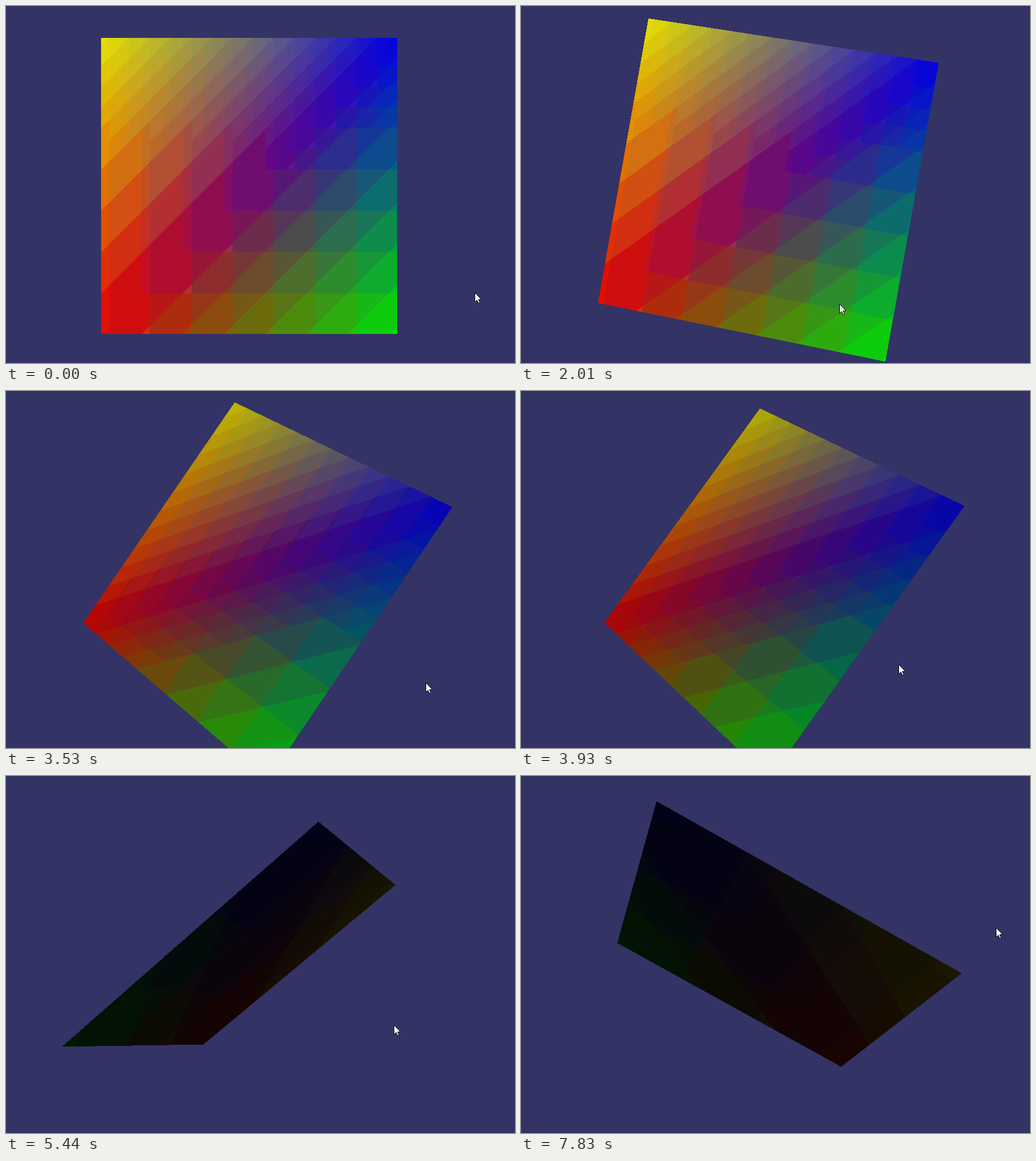
An HTML page with a canvas that plays this animation: 894x627 px, repeating every 7990 ms.

```html
<!DOCTYPE html>
<html lang="en">
<head>
<meta charset="utf-8">
<title>Turning colour square</title>
<style>
  html, body { margin: 0; width: 100%; height: 100%; overflow: hidden; background: #333366; }
  canvas { display: block; width: 100vw; height: 100vh; }
</style>
</head>
<body>
<canvas id="stage" width="894" height="627"></canvas>
<script>
const W = 894, H = 627, LOOP = 7990;
const CX = 427, CY = 316, HALF = 260, CAMERA = 5.65;
const FIRST_TURN = 1590, STEP = 138.67, LEAD = 15;
const ctx = document.getElementById('stage').getContext('2d');
const image = ctx.createImageData(W, H);
const pixels = new Uint32Array(image.data.buffer);
const pack = (r, g, b) => (255 << 24 | b << 16 | g << 8 | r) >>> 0;
const BACK = pack(51, 51, 102);

// Poses as rotation vectors: axis times angle
const POSES = [
  [0, 0, 0],
  [.009, -.138, .176],
  [.216, -.6135, .569],
  [.475, -1.189, .689],
  [.667, -1.841, .805],
  [.743, -2.416, .806],
  [.77, -2.79, 1.707]
];

// Drags: time, pointer x, pointer y, position in POSES
const KEYS = [
  [1036, 823, 503, 0], [1174, 701, 536, 0], [1452, 701, 536, 0],
  [2006, 559, 523, 1], [2838, 185, 417, 2], [2976, 185, 417, 2],
  [3531, 737, 512, 2], [3670, 737, 512, 2], [4641, 220, 288, 3],
  [4900, 150, 260, 4], [5334, 681, 437, 4], [5889, 828, 333, 5],
  [6305, 828, 333, 5], [6580, 856, 338, 5], [6998, 833, 333, 5],
  [7830, 834, 266, 6]
];

const mix = (a, b, k) => a.map((x, i) => x + (b[i] - x) * k);

function stateAt(t) {
  const next = KEYS.findIndex(key => key[0] > t);
  if (next < 0) return KEYS[KEYS.length - 1];
  if (next === 0) return KEYS[0];
  const a = KEYS[next - 1], b = KEYS[next];
  return mix(a, b, (t - a[0]) / (b[0] - a[0]));
}

// Right and down axes of the turned square
function axes(turn) {
  const i = Math.min(Math.floor(turn), POSES.length - 2);
  const spin = mix(POSES[i], POSES[i + 1], turn - i);
  const angle = Math.hypot(...spin);
  const [x, y, z] = spin.map(n => n / (angle || 1));
  const c = Math.cos(angle), s = Math.sin(angle), k = 1 - c;
  return [
    [c + x * x * k, x * y * k + z * s, x * z * k - y * s],
    [x * y * k - z * s, c + y * y * k, y * z * k + x * s]
  ];
}

// Width of a colour band for a given colour and peak brightness
function bandSize(r, g, b, upper, peak) {
  if (peak > 200) {
    const ri = r >> 5, gi = g >> 5, bi = b >> 5;
    return bi - gi >= 4 || (upper && ri - gi <= 2) ? 16 : 32;
  }
  const size = peak > 120 ? 16 : 8;
  const coarse = peak > 40 && !upper && g >= 4 * size && b < 6 * size;
  return coarse ? size * 2 : size;
}

// Colours that fall in one band share their average
const cells = new Uint16Array(W * H);
const count = new Uint32Array(65536);
const sums = [0, 1, 2].map(() => new Uint32Array(65536));

function cellOf(r, g, b, size) {
  const cut = c => (c & -size) >> 3;
  return (size % 32 ? 0 : 32768) | cut(r) << 10 | cut(g) << 5 | cut(b);
}

function drawSquare(turn) {
  const [u, v] = axes(turn);
  const facing = Math.max(0, u[0] * v[1] - u[1] * v[0]);
  const peak = 255 * (.1 + .8 * facing);
  const uz = u[2] / CAMERA, vz = v[2] / CAMERA;
  const inside = [];
  count.fill(0);
  sums.forEach(sum => sum.fill(0));
  pixels.fill(BACK);

  for (let y = 0; y < H; y++) {
    const Y = (y + .5 - CY) / HALF;
    const c = u[1] + Y * uz, d = v[1] + Y * vz;
    for (let x = 0; x < W; x++) {
      const X = (x + .5 - CX) / HALF;
      const a = u[0] + X * uz, b = v[0] + X * vz;
      const det = a * d - b * c;
      const p = (X * d - b * Y) / det, q = (a * Y - X * c) / det;
      if (!(Math.abs(p) <= 1 && Math.abs(q) <= 1)) continue;
      const s = (p + 1) / 2, r = (q + 1) / 2, upper = s + r < 1;
      const red = Math.round(peak * (1 - s));
      const green = Math.round(peak * Math.abs(1 - s - r));
      const blue = Math.round(peak * (upper ? s : 1 - r));
      const cell = cellOf(red, green, blue, bandSize(red, green, blue, upper, peak));
      const at = y * W + x;
      inside.push(at);
      cells[at] = cell;
      count[cell]++;
      sums[0][cell] += red;
      sums[1][cell] += green;
      sums[2][cell] += blue;
    }
  }

  for (const at of inside) {
    const cell = cells[at];
    pixels[at] = pack(...sums.map(sum => Math.round(sum[cell] / count[cell])));
  }
  ctx.putImageData(image, 0, 0);
}

const ARROW = new Path2D('M.5 .5V17L4.3 13.4 6.9 19.3 9.4 18.2 6.8 12.4H11.8Z');

function drawPointer(x, y) {
  ctx.save();
  ctx.translate(Math.round(x), Math.round(y));
  ctx.fillStyle = '#fff';
  ctx.strokeStyle = '#000';
  ctx.fill(ARROW);
  ctx.stroke(ARROW);
  ctx.restore();
}

let shown = null;
const begin = performance.now();

function tick() {
  const t = (performance.now() - begin) % LOOP;
  const held = FIRST_TURN + STEP * Math.floor((t + LEAD - FIRST_TURN) / STEP);
  const [, x, y, turn] = stateAt(held);
  const state = [x, y, turn].join();
  if (state !== shown) {
    shown = state;
    drawSquare(turn);
    drawPointer(x, y);
  }
  requestAnimationFrame(tick);
}
tick();
</script>
</body>
</html>
```
